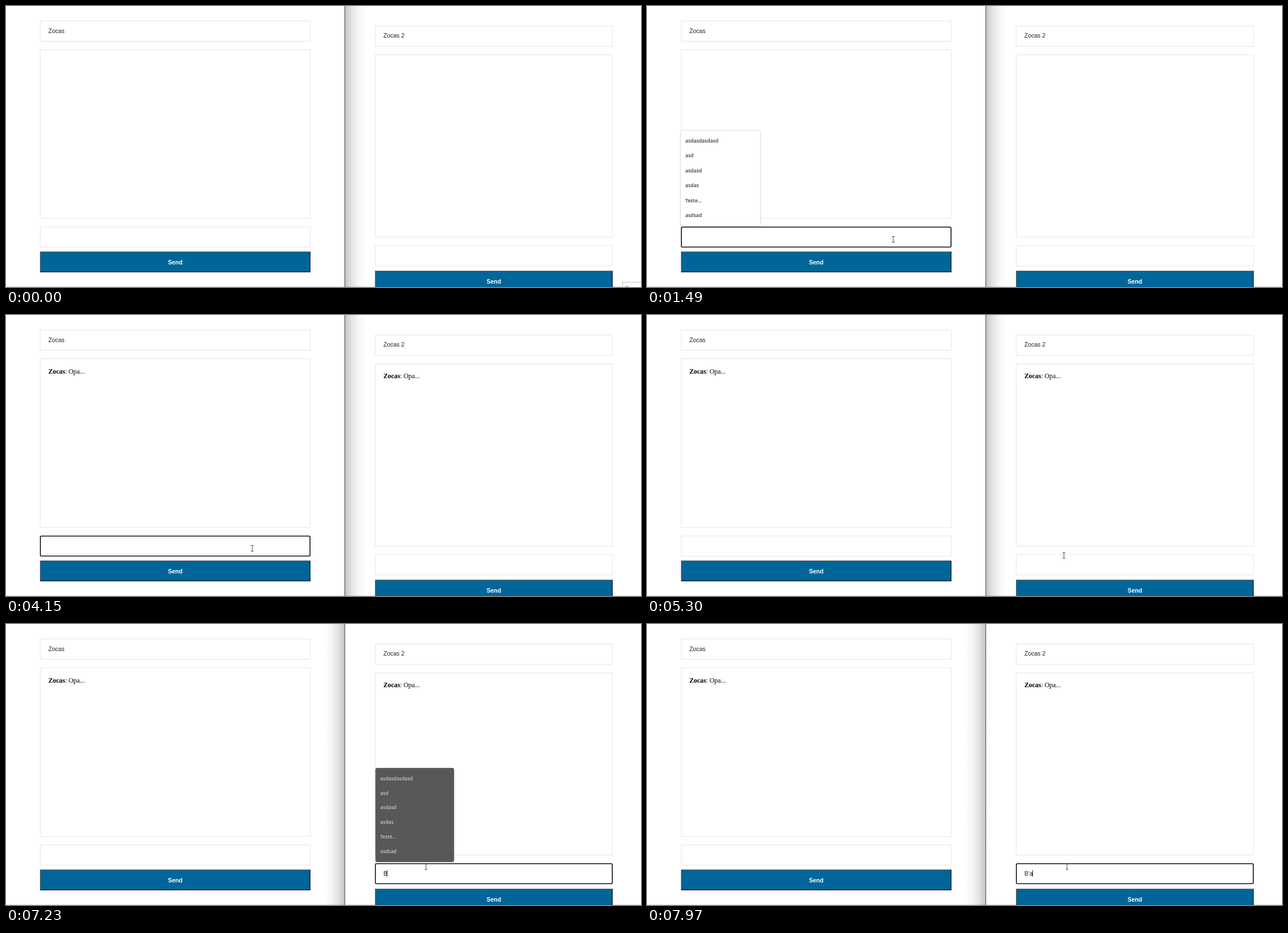
Animation of 1124 by 498 pixels, one loop 8 s. Source, as an HTML page with a canvas:

```html
<!DOCTYPE html>
<html lang="en">
<head>
<meta charset="utf-8">
<title>Chat demo</title>
<style>
html, body { margin: 0; width: 100%; height: 100%; overflow: hidden; background: #fff; }
canvas { display: block; width: 1124px; height: 498px; }
</style>
</head>
<body>
<canvas id="stage" width="1124" height="498"></canvas>
<script>
const ctx = document.getElementById('stage').getContext('2d');
const W = 1124, H = 498, LOOP = 8000;
const SANS = '"Liberation Sans", Arial, sans-serif';
const SERIF = '"Liberation Serif", "Times New Roman", serif';
const MENU = '600 8.7px "Open Sans", "Noto Sans", sans-serif';
const USER = 'Zocas';
const HINTS = ['asdasdasdasd', 'asd', 'asdasd', 'asdas', 'Teste...', 'asdsad'];

const LEFT = {
  x: 60, w: 479, name: 26, log: 77, logH: 300, input: 391, button: 435,
  title: USER, nameBase: 48, logBase: 104, inputBase: 413, sendBase: 458, caretY: 403
};
const RIGHT = {
  x: 653, w: 421, name: 35, log: 86, logH: 324, input: 424, button: 469,
  title: USER + ' 2', nameBase: 56, logBase: 112, inputBase: 446, sendBase: 492, caretY: 436
};
const FIELD_H = 37;

const clamp = v => Math.max(0, Math.min(1, v));
const progress = (t, a, b) => clamp((t - a) / (b - a));
const ease = p => p * p * (3 - 2 * p);
const within = (t, a, b) => t >= a && t < b;
// Last value whose start time has passed.
const latest = (t, list) => list.reduce((v, [at, val]) => t >= at ? val : v, list[0][1]);

// Key times: typed text, caret visibility and pointer path.
const typedLeft = [[0, ''], [1820, 'O'], [1990, 'Op'], [2120, 'Opa'], [3370, 'Opa.'],
  [3500, 'Opa..'], [3630, 'Opa...'], [3820, '']];
const typedRight = [[0, ''], [7160, 'B'], [7900, "B'"], [7970, "B'a"]];
const caretLeft = [[0, 0], [960, 1], [1490, 0], [1820, 1], [2620, 0], [3100, 1],
  [4150, 0], [4700, 1], [5220, 0]];
const caretRight = [[0, 0], [5370, 1], [5910, 0], [6430, 1], [6980, 0], [7160, 1],
  [7700, 0], [7900, 1]];
const path = [[70, 1122, 494], [830, 433, 418.5], [900, 436, 413.5], [4900, 436, 413.5],
  [5300, 738, 426], [5440, 743.5, 430]];

function text(str, x, y, font, color) {
  ctx.font = font;
  ctx.fillStyle = color;
  ctx.fillText(str, x, y);
  return ctx.measureText(str).width;
}

function rect(x, y, w, h, color) {
  ctx.fillStyle = color;
  ctx.fillRect(x, y, w, h);
}

function frame(x, y, w, h) {
  ctx.strokeStyle = '#e6e6e6';
  ctx.lineWidth = 1;
  ctx.strokeRect(x + .5, y + .5, w - 1, h - 1);
}

function rounded(x, y, w, h, r) {
  ctx.beginPath();
  ctx.roundRect(x, y, w, h, r);
}

function focusRing(p) {
  rounded(p.x + .8, p.input + .8, p.w - 1.6, FIELD_H - 1.6, 2);
  ctx.fillStyle = '#fff';
  ctx.fill();
  ctx.strokeStyle = '#101010';
  ctx.lineWidth = 1.6;
  ctx.stroke();
}

function button(p) {
  const { x, w, button: y } = p, b = 1.5;
  rect(x, y, w, FIELD_H, '#1d2b33');
  ctx.fillStyle = '#6b7479';
  ctx.beginPath();
  ctx.moveTo(x, y);
  ctx.lineTo(x + w, y);
  ctx.lineTo(x + w - b, y + b);
  ctx.lineTo(x + b, y + b);
  ctx.lineTo(x + b, y + FIELD_H - b);
  ctx.lineTo(x, y + FIELD_H);
  ctx.fill();
  rect(x + b, y + b, w - 2 * b, FIELD_H - 2 * b, '#006699');
  ctx.textAlign = 'center';
  text('Send', x + w / 2, p.sendBase, 'bold 10.5px ' + SANS, '#fff');
  ctx.textAlign = 'left';
}

function pane(p, state) {
  const tx = p.x + 15, font = '10.5px ' + SANS;
  frame(p.x, p.name, p.w, FIELD_H);
  text(p.title, tx, p.nameBase, font, '#1f2328');
  frame(p.x, p.log, p.w, p.logH);
  if (state.sent) {
    const nameW = text(USER, tx, p.logBase, 'bold 11.8px ' + SERIF, '#000');
    text(': Opa...', tx + nameW, p.logBase, '11.8px ' + SERIF, '#000');
  }
  if (state.focus) focusRing(p);
  else frame(p.x, p.input, p.w, FIELD_H);
  const typedW = text(state.typed, tx, p.inputBase, font, '#1f2328');
  if (state.focus && state.caret) {
    const drop = p === RIGHT && !state.typed ? 1 : 0;
    rect(Math.floor(tx + typedW - .3) + (typedW ? 0 : 1), p.caretY + drop, 1, 12, '#222');
  }
  button(p);
}

function menu(x, y, show, dark) {
  if (show <= 0) return;
  const w = 142, h = 170, s = 1 - .07 * (1 - show);
  ctx.save();
  ctx.globalAlpha = show;
  ctx.translate(x + w / 2, y + h / 2);
  ctx.scale(s, s);
  ctx.translate(-w / 2, -h / 2);
  rounded(.5, .5, w - 1, h - 1, 2.5);
  ctx.save();
  ctx.shadowColor = 'rgba(0,0,0,.16)';
  ctx.shadowBlur = 3;
  ctx.shadowOffsetY = 1;
  ctx.fillStyle = dark ? '#292a2c' : '#fff';
  ctx.fill();
  ctx.restore();
  ctx.strokeStyle = dark ? '#4a4b4d' : '#e4e4e4';
  ctx.lineWidth = 1;
  ctx.stroke();
  HINTS.forEach((hint, i) =>
    text(hint, 8.7, 22 + i * 26.4, MENU, dark ? '#ececec' : '#36373a'));
  ctx.restore();
}

function divider(toLeft) {
  const dir = toLeft ? -1 : 1, x = toLeft ? 599 : 600, size = 38;
  const g = ctx.createLinearGradient(x, 0, x + dir * size, 0);
  g.addColorStop(0, 'rgba(0,0,0,.23)');
  g.addColorStop(.3, 'rgba(0,0,0,.11)');
  g.addColorStop(.65, 'rgba(0,0,0,.03)');
  g.addColorStop(1, 'rgba(0,0,0,0)');
  rect(toLeft ? x - size : x, 0, size, H, g);
  rect(599, 0, 1.3, H, '#666');
}

function pointerAt(t) {
  for (let i = 1; i < path.length; i++) {
    const [a, ax, ay] = path[i - 1], [b, bx, by] = path[i];
    if (t < b) {
      const k = ease(progress(t, a, b));
      return [ax + (bx - ax) * k, ay + (by - ay) * k];
    }
  }
  return path[path.length - 1].slice(1);
}

const overInput = (p, x, y) =>
  x > p.x && x < p.x + p.w && y > p.input && y < p.input + FIELD_H;

function pointer(t) {
  if (t < 70) return;
  const [x, y] = pointerAt(t);
  ctx.save();
  ctx.translate(x, y);
  ctx.beginPath();
  if (overInput(LEFT, x, y) || overInput(RIGHT, x, y)) {
    ctx.moveTo(-2.5, -5);
    ctx.lineTo(2.5, -5);
    ctx.moveTo(0, -5);
    ctx.lineTo(0, 5);
    ctx.moveTo(-2.5, 5);
    ctx.lineTo(2.5, 5);
    ctx.strokeStyle = '#4a4a4a';
    ctx.lineWidth = 1;
    ctx.stroke();
  } else {
    [[0, 0], [0, 13], [3, 10.3], [5, 15], [7, 14.2], [5, 9.6], [9, 9.4]]
      .forEach(([px, py]) => ctx.lineTo(px, py));
    ctx.closePath();
    ctx.fillStyle = '#fff';
    ctx.fill();
    ctx.strokeStyle = '#222';
    ctx.lineWidth = .9;
    ctx.stroke();
  }
  ctx.restore();
}

function tooltip() {
  rect(1091, 489, 33, 9, '#fff');
  ctx.strokeStyle = '#bdbdbd';
  ctx.lineWidth = 1;
  ctx.strokeRect(1091.5, 489.5, 40, 20);
  ctx.beginPath();
  ctx.arc(1099, 499.5, 3, Math.PI, 2 * Math.PI);
  ctx.strokeStyle = '#777';
  ctx.stroke();
}

function draw(t) {
  rect(0, 0, W, H, '#fff');
  rect(0, 497, W, 1, '#dedede');
  divider(t >= 5370);
  const sent = t >= 3820;
  pane(LEFT, {
    sent, focus: within(t, 900, 5230),
    typed: latest(t, typedLeft), caret: latest(t, caretLeft)
  });
  pane(RIGHT, {
    sent, focus: t >= 5370,
    typed: latest(t, typedRight), caret: latest(t, caretRight)
  });
  menu(59, 220, progress(t, 920, 1180) - progress(t, 1820, 2120), false);
  menu(652.5, 253.5, progress(t, 5420, 5700) - progress(t, 7160, 7440), true);
  if (t < 140) tooltip();
  pointer(t);
}

const start = performance.now();
function tick(now) {
  draw(Math.max(0, now - start) % LOOP);
  requestAnimationFrame(tick);
}
draw(0);
requestAnimationFrame(tick);
</script>
</body>
</html>
```
